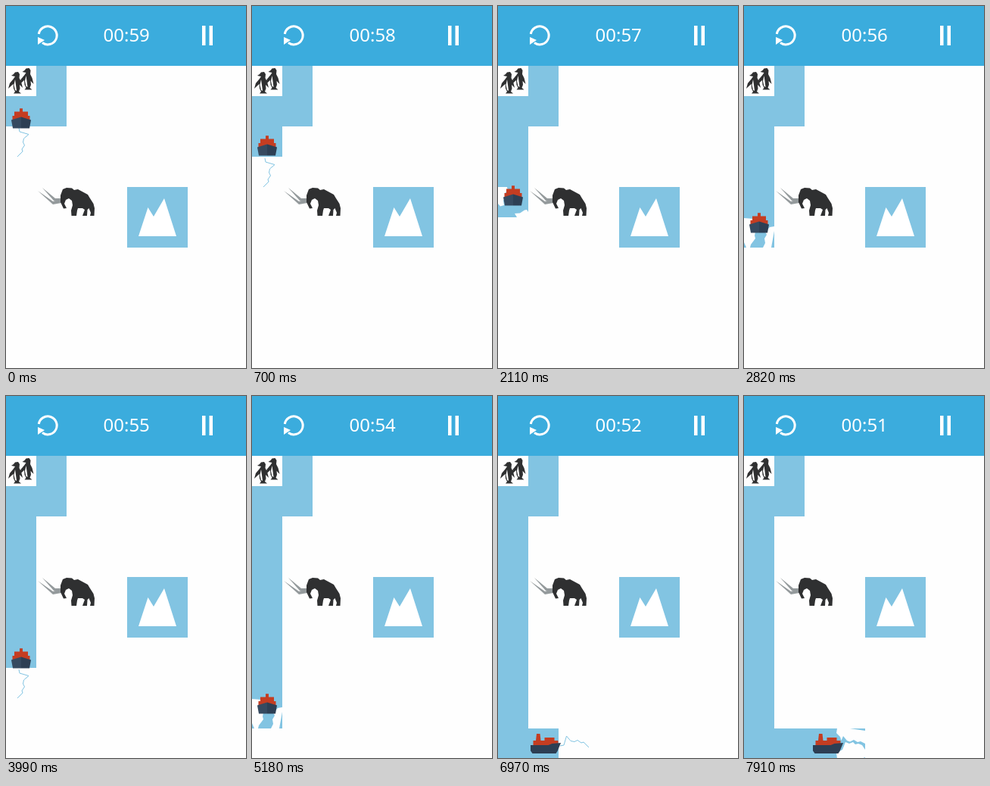
An HTML page that plays this animation: 317x478 px, repeating every 8000 ms.

```html
<!DOCTYPE html>
<html lang="en">
<head>
<meta charset="utf-8">
<title>Icebreaker</title>
<style>
  html, body { margin: 0; width: 100%; height: 100%; overflow: hidden; background: #fefefe; }
  svg { display: block; width: 317px; height: 478px; }
  text { font: 24px "Noto Sans", "Open Sans", sans-serif; fill: #fff; }
  rect { shape-rendering: crispEdges; }
  .water { fill: #82c4e2; }
  .ice { fill: #fefefe; }
  .dark { fill: #2f3031; }
  .red { fill: #c43d22; }
  .hull { fill: #2d3f54; }
</style>
</head>
<body>
<svg viewBox="0 0 317 478">
  <defs>
    <!-- Ice breaking up in one cell, ship coming from the top -->
    <g id="ice0"></g>
    <g id="ice1">
      <path d="M17 2L18 7 30 10.500 23.500 16 22.500 21 24.500 25 21 30 22 33 15 40" fill="none" stroke="#82c4e2"/>
    </g>
    <g id="ice2" class="water">
      <path d="M0 0H40V3L34 2 29 7 24 8.500 30 11 24 16 22.500 20 25 25 22 30 23 34 20 40H12L18 36 20 31 19 27 22 24 20 19 22 14 12 10 8 2 0 3Z"/>
      <path d="M40 20V40H37ZM0 35L2 40H0Z"/>
    </g>
    <g id="ice3">
      <rect class="water" width="40" height="40"/>
      <path class="ice" d="M0 1L13 2 14 10 16 15 14 24 15 28 9 36 8 40H3L0 33ZM40 12V18L36 40H25L28 34 27 28 30 23 28 19 34 13Z"/>
    </g>
    <g id="ice4">
      <rect class="water" width="40" height="40"/>
      <path class="ice" d="M0 0H12L13 5 9 8 10 14 7 18 8 24 3 25.500 0 22ZM22 35L29 34.500 35 30.500 38 30 40 33V40H25Z"/>
    </g>
    <g id="ice5"><rect class="water" width="40" height="40"/></g>

    <g id="penguin">
      <path class="dark" d="M7 92L10 90 12 87.500 16 87 18 90 17.500 95 20 100 22 108 18 104 18.500 109 17 113 20 115.500H10L12 113 10 109 9.500 103 3 109 5 102 10 96 12 93Z"/>
      <path class="ice" d="M12 97L10.500 104 12 111 14 112 13 104Z"/>
    </g>
  </defs>

  <rect width="317" height="478" class="ice"/>
  <rect width="317" height="79" fill="#3bacdd"/>
  <path d="M43.300 37A12 12 0 1 1 48 48.500" fill="none" stroke="#fff" stroke-width="3"/>
  <path d="M42 41L51 45 42 51Z" fill="#fff"/>
  <path d="M259 26h4.500v26h-4.500zM268.500 26h4.500v26h-4.500z" fill="#fff"/>
  <text id="clock" x="128.500" y="47">00:59</text>

  <rect class="water" y="119" width="40" height="40"/>
  <rect class="water" x="40" y="79" width="40" height="80"/>
  <use href="#penguin" x="14.500" y="-5"/>
  <use href="#penguin"/>

  <rect class="water" x="160" y="239" width="80" height="80"/>
  <path d="M175 304L187.500 266 195 278 209 254 225 304Z" fill="#fff"/>

  <g id="cells"></g>

  <path d="M42 244L62 258 73 255V260L62 262ZM48 240L65 254 73 254V258L63 257Z" fill="#949a9c"/>
  <path class="dark" d="M72 250L75 242 80 240 87 240.500 90 243 95 242 108 249 111 254 115.500 261 117 267 116.500 277H111L112 273 109.500 267 107.500 269 107 277H101L104 269 101 267 95 267 94 270 93 277H86.500L86 270 88 263 87 257 83 254 79 256 77 261 80 267 76 267.500 72 259Z"/>

  <g id="shipDown">
    <path class="red" d="M-2 -13.300H2V-9H9V-3.500H11.500V2H-11.500V-3.500H-9V-9H-2Z"/>
    <path d="M-13 2L0 -2V13H-11Z" fill="#364a60"/>
    <path d="M13 2L0 -2V13H11Z" class="hull"/>
  </g>
  <g id="shipRight">
    <path class="red" d="M-11.500 -13H-7L-6 -4H-1V-8H12V-4H17V4H-16V-4H-12.500Z"/>
    <path class="hull" d="M-19.500 2H4L9 0 20.500 -1 16 10 14 13H-17L-19.500 9.500Z"/>
  </g>
</svg>
<script>
const LOOP = 8000, STEP = 118, SPEED = 6, CELL = 40, START = 148.5, TURN = 459;
const byId = id => document.getElementById(id);
const clock = byId('clock'), shipDown = byId('shipDown'), shipRight = byId('shipRight');

const cells = Array.from({ length: 11 }, (_, i) => {
  const use = document.createElementNS('http://www.w3.org/2000/svg', 'use');
  const move = i < 8
    ? `translate(0 ${159 + i * CELL})`
    : `translate(${(i - 7) * CELL} 479) rotate(-90)`;
  use.setAttribute('transform', move);
  byId('cells').append(use);
  return { use, start: (i < 8 ? 159 : 160) + i * CELL };
});

function draw(time) {
  const step = Math.floor((time + 8) / STEP);
  const path = START + step * SPEED;
  const down = path < TURN;

  const ship = down ? shipDown : shipRight;
  shipDown.style.display = down ? '' : 'none';
  shipRight.style.display = down ? 'none' : '';
  ship.setAttribute('transform', down ? `translate(20 ${path})` : `translate(${path - 440} 459)`);

  // The ice passes through four stages while the ship crosses one cell length
  for (const { use, start } of cells) {
    const stage = Math.floor((path - start + CELL / 2) / 10) + 1;
    use.setAttribute('href', '#ice' + Math.max(0, Math.min(5, stage)));
  }
  clock.textContent = '00:' + (59 - Math.floor((step * STEP + 850) / 1000));
}

const begin = performance.now();
function tick() {
  draw((performance.now() - begin) % LOOP);
  requestAnimationFrame(tick);
}
tick();
</script>
</body>
</html>
```
